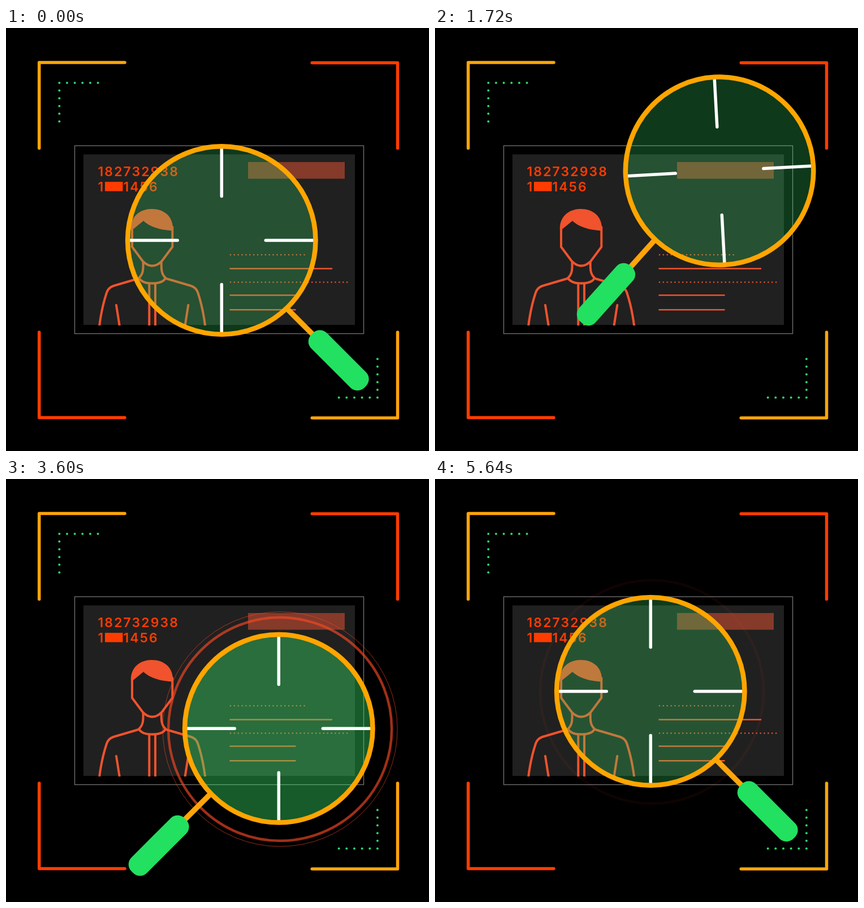
These frames come from a looping animation (748x748 px, 5680 ms). An HTML page:

```html
<!DOCTYPE html>
<html lang="en">
<head>
<meta charset="utf-8">
<title>Identity check</title>
<style>
  html, body { margin: 0; width: 100%; height: 100%; overflow: hidden; background: #000; }
  svg { display: block; width: 100vw; height: 100vh; }
  .line { fill: none; stroke-linecap: round; stroke-linejoin: round; }
  .id { font: 600 23px Inter, "Open Sans", sans-serif; letter-spacing: 2.1px; fill: #ff3c00; }
</style>
</head>
<body>
<svg viewBox="0 0 748 748">
  <defs>
    <linearGradient id="glow">
      <stop offset="0" stop-color="#4be68c" stop-opacity=".3"/>
      <stop offset=".7" stop-color="#4be68c"/>
    </linearGradient>
    <clipPath id="barClip"><rect x="428" y="237" width="171" height="29.5"/></clipPath>
    <clipPath id="cardClip"><rect x="137" y="223" width="480" height="303"/></clipPath>
  </defs>
  <rect width="748" height="748"/>

  <g id="side">
    <g class="line" stroke-width="5.5">
      <path stroke="#ffa50a" d="M58.700 212.500V61H210"/>
      <path stroke="#ff3c00" d="M58.700 538V689H210"/>
    </g>
    <g id="marks" fill="#2fd867"></g>
  </g>
  <use href="#side" transform="rotate(180 375.600 375.200)"/>

  <rect x="121.5" y="208.2" width="511" height="332.3" fill="none" stroke="#747474" stroke-width="1.3"/>
  <rect x="137" y="223.5" width="480" height="301.5" fill="#202020"/>
  <g class="id">
    <text x="162.5" y="261.8">182732938</text>
    <text x="162.5" y="288.8">1</text>
    <rect x="175" y="272" width="31.5" height="16.5"/>
    <text x="207.5" y="288.8">1456</text>
  </g>
  <rect x="428" y="237" width="171" height="29.5" fill="#853a2a"/>

  <g clip-path="url(#cardClip)" stroke="#f0532d" stroke-width="4" class="line">
    <path fill="#f0532d" stroke="none" d="M221 359C219 334 236 320 258 320S297 334 295 358.500C272 357 255 352 243 341Z"/>
    <g id="half">
      <path d="M223 352V387L242 412.500Q250 420.500 258.500 420.500"/>
      <path d="M242.500 414C243 428 242 436 235 442Q240 451.500 258.500 451.500"/>
      <path d="M236 442.500L190 456Q181 459 178 468Q169 495 165 528M195 490L201 528M253.300 452V528"/>
    </g>
    <use href="#half" transform="translate(517.300) scale(-1 1)"/>
  </g>

  <path class="line" stroke="#f0532d" stroke-width="2.600" d="M396.500 425.500H576M396.500 472.500H511.500M396.500 498.300H511.500"/>
  <g id="dots" fill="#e8532f"></g>

  <g id="rings" fill="none" stroke="#f54824">
    <circle id="ring" r="197.500" stroke-width="4.500"/>
    <circle id="halo" r="207.500" stroke-width="1"/>
  </g>

  <g id="lens">
    <circle id="glass" r="166" fill="#38e468"/>
    <path class="line" stroke="#fff" stroke-width="5.500" d="M0 -163V-78M0 163V78M-163 0H-78M163 0H78"/>
    <g transform="rotate(45) translate(0 3.700)">
      <path stroke="#ffa50a" stroke-width="9.500" d="M166 0H236"/>
      <rect x="230" y="-19.300" width="132.600" height="38.600" rx="17" fill="#22e060"/>
    </g>
    <circle r="166.200" fill="none" stroke="#ffa500" stroke-width="8.500"/>
  </g>

  <g clip-path="url(#barClip)">
    <rect id="sweep" y="237" width="101" height="29.500" fill="url(#glow)"/>
  </g>
</svg>
<script>
  const LOOP = 5680;
  const $ = id => document.getElementById(id);
  const set = (id, name, value) => $(id).setAttribute(name, value);

  function addDots(id, x, y, dx, dy, count, r) {
    for (let i = 0; i < count; i++) {
      const dot = document.createElementNS("http://www.w3.org/2000/svg", "circle");
      dot.setAttribute("cx", x + i * dx);
      dot.setAttribute("cy", y + i * dy);
      dot.setAttribute("r", r);
      $(id).append(dot);
    }
  }
  addDots("marks", 94.3, 97, 13.65, 0, 6, 2);
  addDots("marks", 94.3, 110.6, 0, 13.65, 5, 2);
  addDots("dots", 397, 401, 6.87, 0, 20, 1.3);
  addDots("dots", 397, 449.5, 6.87, 0, 31, 1.3);

  const ramp = (t, from, to) => Math.min(1, Math.max(0, (t - from) / (to - from)));
  const smooth = p => p < .5 ? 4 * p ** 3 : 1 - (2 - 2 * p) ** 3 / 2;
  const mix = (a, b, p) => a + (b - a) * p;

  // Each stop: where the lens rests, when it travels there, when it pulses.
  const home = { x: 381.3, y: 375.5, turn: 0 };
  const stops = [
    { x: 244.8, y: 281.3, turn: 0, leave: 40, arrive: 520, pulse: 560 },
    { x: 512.3, y: 251.8, turn: 90, leave: 1260, arrive: 1840, pulse: 2020 },
    { x: 482.3, y: 441.3, turn: 90, leave: 2560, arrive: 3040, pulse: 3340 },
    { ...home, leave: 4840, arrive: 4841, pulse: 5620 }
  ];

  function pose(t) {
    let { x, y, turn } = home;
    for (const s of stops) {
      const p = smooth(ramp(t, s.leave, s.arrive));
      x = mix(x, s.x, p);
      y = mix(y, s.y, p);
      turn = mix(turn, s.turn, p);
    }
    return { x, y, turn };
  }

  function draw(now) {
    const t = now % LOOP;
    const { x, y, turn } = pose(t);
    const last = stops.filter(s => s.pulse <= t).pop();
    const age = last ? t - last.pulse : 0;
    const fall = 1 - ramp(age, 340, 570);

    set("lens", "transform", `translate(${x} ${y}) rotate(${turn})`);
    set("lens", "opacity", 1 - ramp(t, 4400, 4800) + ramp(t, 4880, 5280));
    set("glass", "fill-opacity", .25 + .16 * (ramp(age, 0, 280) - ramp(age, 340, 820)));
    set("rings", "transform", `translate(${x + 2.3} ${y + 1})`);
    set("ring", "opacity", .66 * ramp(age, 0, 240) * fall);
    set("halo", "opacity", .6 * ramp(age, 40, 260) * fall);
    set("sweep", "x", mix(327, 599, ramp(t, 1960, 2380)));
    requestAnimationFrame(draw);
  }
  draw(performance.now());
</script>
</body>
</html>
```
